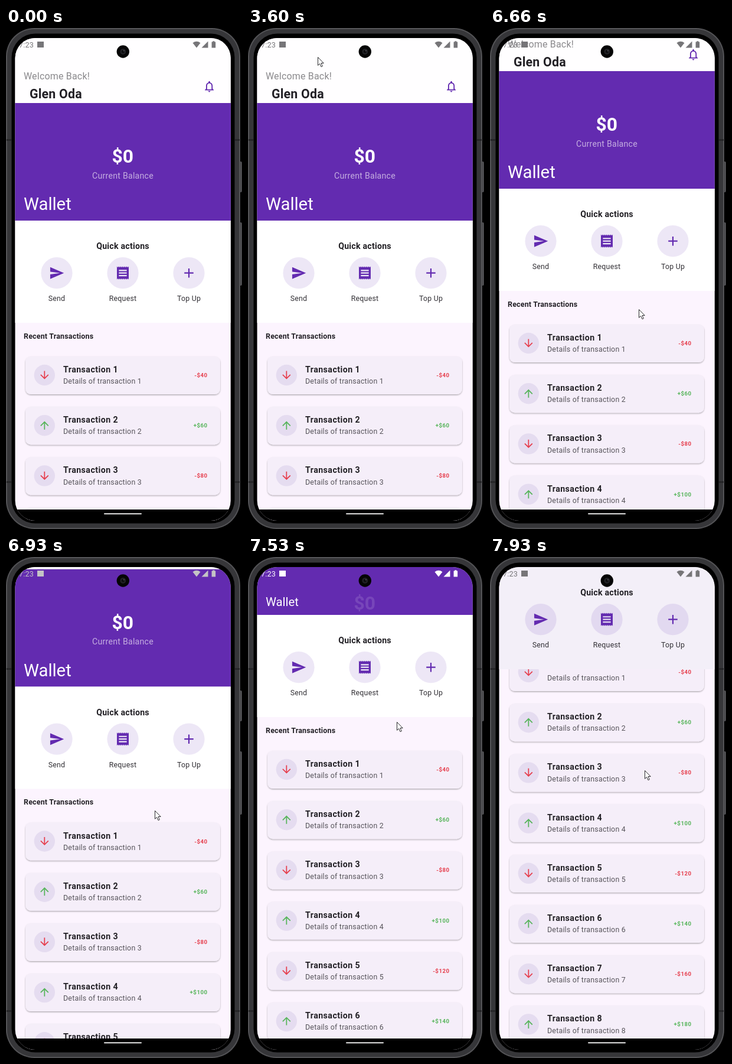
Write an HTML page that moves like this. It is 400 px wide and 848 px high and loops after 8000 ms.

```html
<!DOCTYPE html>
<html lang="en">
<head>
<meta charset="utf-8">
<title>Wallet</title>
<style>
html, body { margin: 0; width: 100%; height: 100%; overflow: hidden; background: #000; }
svg { display: block; width: 100vw; height: 100vh; font-family: Roboto, sans-serif; letter-spacing: .22px; }
.b { font-weight: 700; }
.m { text-anchor: middle; }
.e { text-anchor: end; }
.wide { letter-spacing: .44px; }
.tight { letter-spacing: 0; }
</style>
</head>
<body>
<svg id="stage" viewBox="0 0 400 848"></svg>
<script>
const LOOP = 8000, STEP = 1000 / 15;
const PURPLE = '#632bb0', INK = '#222025', RED = '#e6404f', GREEN = '#58b55c';
const TOP = 17, BAR = 199, BAR_MIN = 71.4, BAR_Y = 127, QUICK_Y = 326;

const ICONS = {
  bell: 'M12 22c1.1 0 2-.9 2-2h-4c0 1.1.89 2 2 2zm6-6v-5c0-3.07-1.64-5.64-4.5-6.32V4c0-.83-.67-1.5-1.5-1.5s-1.5.67-1.5 1.5v.68C7.63 5.36 6 7.92 6 11v5l-2 2v1h16v-1l-2-2zm-2 1H8v-6c0-2.48 1.51-4.5 4-4.5s4 2.02 4 4.5v6z',
  send: 'M2 21L23 12 2 3v7l15 2-15 2z',
  receipt: 'M18 17H6v-2h12zm0-4H6v-2h12zm0-4H6V7h12zM3 22' + 'l1.5-1.5 1.5 1.5'.repeat(6) + 'V2' + 'l-1.5 1.5-1.5-1.5'.repeat(6) + 'z',
  plus: 'M19 13h-6v6h-2v-6H5v-2h6V5h2v6h6z',
  down: 'M20 12l-1.41-1.41L13 16.17V4h-2v12.17l-5.58-5.59L4 12l8 8z',
  up: 'M4 12l1.41 1.41L11 7.83V20h2V7.83l5.58 5.59L20 12l-8-8z'
};

const text = (x, y, size, fill, str, cls = '') =>
  `<text x="${x}" y="${y}" font-size="${size}" fill="${fill}" class="${cls}">${str}</text>`;
const icon = (name, cx, cy, size, fill) =>
  `<path d="${ICONS[name]}" fill="${fill}" fill-rule="evenodd" transform="translate(${cx - size / 2} ${cy - size / 2}) scale(${size / 24})"/>`;
const box = (x, y, w, h, r, fill, more = '') =>
  `<rect x="${x}" y="${y}" width="${w}" height="${h}" rx="${r}" fill="${fill}" ${more}/>`;

function card(n) {
  const debit = n % 2, color = debit ? RED : GREEN;
  return `<g transform="translate(0 ${(n - 1) * 85.2})">
    ${box(33, 556, 330, 64, 9, '#f5eef9', 'filter="url(#shade)"')}
    <circle cx="65.3" cy="587.5" r="17.7" fill="#e5dcf0"/>
    ${icon(debit ? 'down' : 'up', 65.3, 587.5, 21.3, color)}
    ${text(97, 583, 14.2, INK, 'Transaction ' + n, 'b wide')}
    ${text(97, 602.3, 12.4, '#57545b', 'Details of transaction ' + n)}
    ${text(341.5, 591, 9.75, color, (debit ? '-$' : '+$') + (20 + 20 * n), 'b e wide')}
  </g>`;
}

function action(x, name, label) {
  return `<circle cx="${x}" cy="414.7" r="26.6" fill="${PURPLE}" fill-opacity=".115"/>
    ${icon(name, x, 414.7, 26.6, PURPLE)}${text(x, 462, 12.4, '#333136', label, 'm')}`;
}

const tick = y => box(1, y, 8, 3, 0, '#262628') + box(388, y, 8, 3, 0, '#262628');

const $ = id => document.getElementById(id);
$('stage').innerHTML = `
  <defs>
    <clipPath id="screen">${box(15.5, TOP, 365.3, 817, 34, '#fff')}</clipPath>
    <filter id="shade" x="-5%" y="-10%" width="110%" height="130%">
      <feDropShadow dx="0" dy="1.3" stdDeviation="1.1" flood-color="#000" flood-opacity=".32"/>
    </filter>
  </defs>
  ${box(394, 226, 6, 52, 2, '#4b4b4e')}${box(394, 329, 6, 107, 2, '#4b4b4e')}
  ${box(0, 0, 397, 848, 48, '#535356')}
  ${box(2, 2, 393, 844, 46, '#363639')}
  ${tick(188)}${tick(767)}
  ${box(9.5, 9.5, 378, 829, 40, '#000')}
  <g clip-path="url(#screen)">
    ${box(15, TOP, 367, 820, 0, '#fcf4fe')}
    <g id="list">
      ${text(30, 525.7, 12.4, INK, 'Recent Transactions', 'b')}
      ${[1, 2, 3, 4, 5, 6, 7, 8, 9].map(card).join('')}
    </g>
    <rect id="bar" x="15" width="367" fill="${PURPLE}"/>
    <g id="balance">
      ${text(197.8, 228, 31.9, '#fff', '$0', 'b m tight')}
      ${text(198, 254.6, 14.2, '#c5aee0', 'Current Balance', 'm')}
    </g>
    <g id="wallet">${text(0, 0, 19.5, '#fff', 'Wallet', 'tight')}</g>
    <g id="quick">
      <rect id="quickBg" x="15" y="${QUICK_Y}" width="367" height="173"/>
      ${text(198, 374, 14.2, INK, 'Quick actions', 'b m')}
      ${action(86, 'send', 'Send')}${action(198, 'receipt', 'Request')}${action(310, 'plus', 'Top Up')}
    </g>
    <g id="intro">
      ${box(15, -120, 367, 120 + BAR_Y, 0, '#fffeff')}
      ${text(30, 87.4, 15.95, '#8a898c', 'Welcome Back!')}
      ${text(40, 119.3, 21.3, INK, 'Glen Oda', 'b')}
      ${icon('bell', 344.6, 99, 22.5, PURPLE)}
    </g>
    <g id="status">
      <text x="22" y="33" font-size="12.6">7:23</text>
      <rect x="53" y="23" width="11" height="10"/>
      <path d="M316.5 25.2Q323 20.4 329.5 25.2L323 33.4Z"/>
      <path d="M331.5 33.4L342.5 22.4V33.4Z"/>
      <path d="M348.6 23.6H350.4V22.3H353.4V23.6H355.2V33.5H348.6Z"/>
    </g>
    ${box(15, 815, 367, 22, 0, '#000')}
  </g>
  ${box(166, 821.3, 64, 2, 1, '#e6e6e6')}
  <circle cx="198.3" cy="40" r="10.7" fill="#050505"/>
  <circle cx="198.3" cy="40" r="5" fill="#202024"/>
  <circle cx="198.3" cy="40" r="2.4" fill="#0c0c0e"/>
  <circle cx="199.8" cy="38.4" r="1" fill="#55555c"/>
  <path id="cursor" d="M.5 .5V14.3L3.7 11.4 6 16.7 8.3 15.7 6 10.5H10.2Z" fill="#fff" stroke="#2b2b2e" stroke-width="1"/>`;

// Keys are [tick, ...values], a tick being 1/15 s.
const SCROLL = [[96, 0], [100, 54], [104, 106.5], [113, 228], [116, 314], [119, 393]];
const POINTER = [
  [54, 118, 49], [55, 376, 48], [80, 149, 440], [81, 138, 433], [82, 153, 447], [83, 153, 447],
  [86, 108, 400], [89, 180, 335], [93, 252, 561], [96, 252, 540],
  [100, 252, 476], [104, 252, 429], [113, 252, 279], [115, 253, 270], [119, 262, 361]
];

const clamp = (v, a = 0, b = 1) => Math.min(b, Math.max(a, v));
const ramp = (v, a, b) => clamp((v - a) / (b - a));
const mix = (a, b, t) => `rgb(${a.map((v, i) => Math.round(v + (b[i] - v) * t))})`;

function track(keys, k) {
  const i = keys.findIndex(key => key[0] > k);
  if (i === 0) return keys[0].slice(1);
  if (i < 0) return keys[keys.length - 1].slice(1);
  const a = keys[i - 1], b = keys[i], t = ramp(k, a[0], b[0]);
  return a.slice(1).map((v, j) => v + (b[j + 1] - v) * t);
}

const move = (id, x, y, s = 1) => $(id).setAttribute('transform', `translate(${x} ${y}) scale(${s})`);

function draw(ms) {
  const k = Math.floor((ms + 7) / STEP);
  const [s] = track(SCROLL, k);

  move('intro', 0, -s);
  move('list', 0, -s);

  // The app bar shrinks against the top edge, then slides away.
  const bottom = QUICK_Y - s;
  const height = clamp(bottom - TOP, BAR_MIN, BAR);
  const top = bottom - height, range = BAR - BAR_MIN;
  const t = (BAR - height) / range, scale = 1.5 - .5 * t;
  $('bar').setAttribute('y', top);
  $('bar').setAttribute('height', height);
  move('balance', 0, top - BAR_Y - t * range / 4);
  $('balance').setAttribute('opacity', 1 - ramp(t, .58, .975));
  move('wallet', 30, bottom - 9 - 6 * scale, scale);

  // Quick actions stay pinned and take a tint over the list.
  const pinned = ramp(s, QUICK_Y - TOP, QUICK_Y - TOP + 14);
  move('quick', 0, Math.max(-s, TOP - QUICK_Y));
  $('quickBg').setAttribute('fill', mix([255, 255, 255], [243, 239, 248], pinned));

  const light = ramp(s, 98, 113) * (1 - ramp(s, 292, 304));
  $('status').setAttribute('fill', mix([118, 117, 120], [255, 255, 255], light));

  const [x, y] = track(POINTER, k);
  move('cursor', x, y);
  $('cursor').setAttribute('visibility', k === 54 || k === 55 || k >= 80 ? 'visible' : 'hidden');
}

const start = performance.now();
function loop() {
  draw((performance.now() - start) % LOOP);
  requestAnimationFrame(loop);
}
loop();
</script>
</body>
</html>
```
